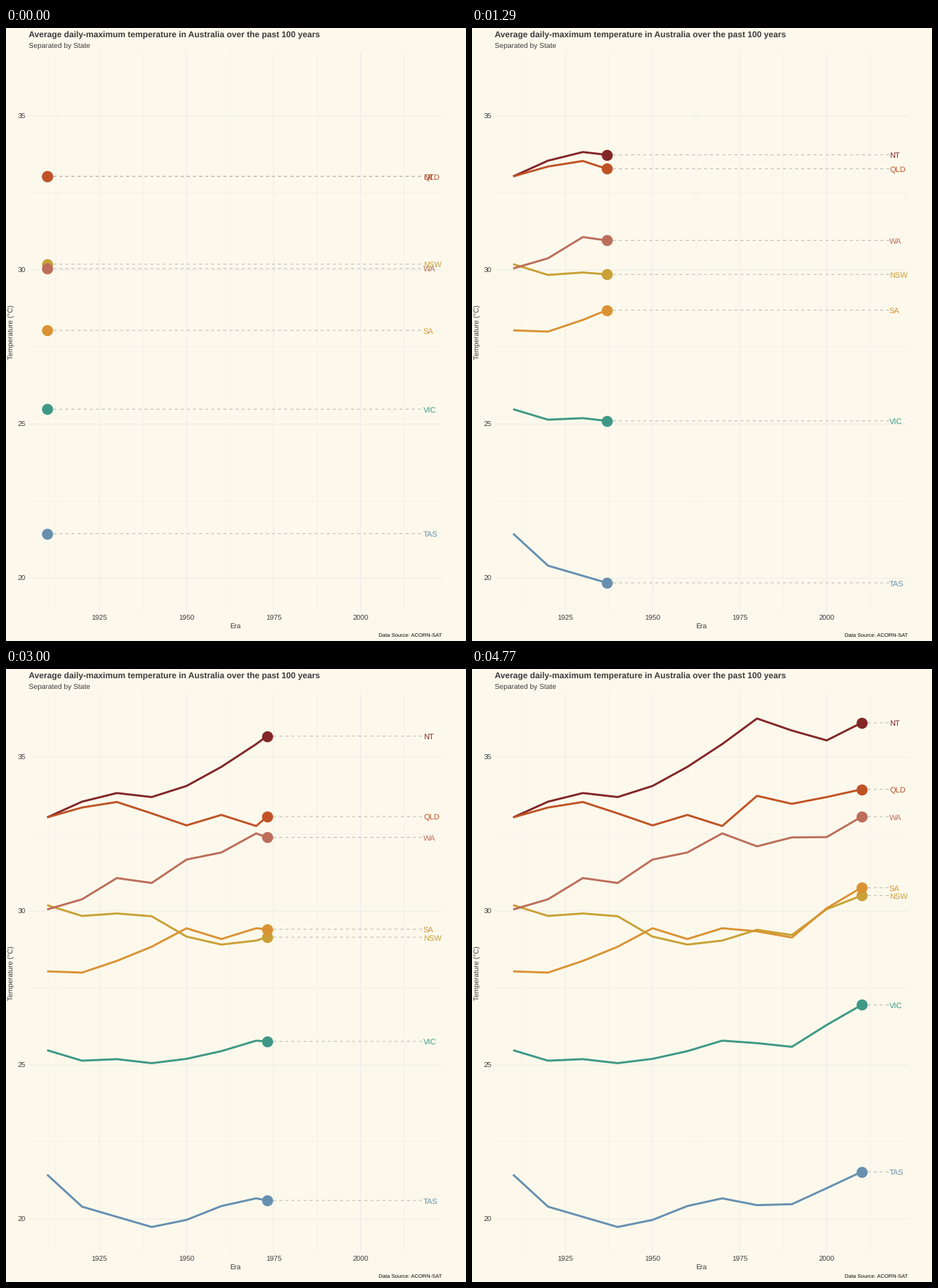
Recreate the animation shown at these times as a matplotlib script. Size 648x864 px, loop 7200 ms.

```python
import numpy as np
import matplotlib.pyplot as plt
from matplotlib.animation import FuncAnimation

WIDTH, HEIGHT, DPI = 648, 864, 72  # at 72 dpi one point is one pixel
FRAMES, INTERVAL, REVEAL_STEPS = 240, 30, 159
LEFT, RIGHT, TOP, BOTTOM = 31.5, 614.5, 34.2, 822.5
LABEL_YEAR = 2018
INK, PAPER, GRID, DASH = "#3C3C3C", "#FCF9EC", "#EBEBEB", "#BABABA"

plt.rcParams.update({
    "font.family": "Liberation Sans",
    "text.hinting": "none",
    "lines.solid_capstyle": "butt",
    "lines.solid_joinstyle": "round",
})

years = np.arange(1910, 2011, 10)
key_frames = np.round(np.linspace(0, REVEAL_STEPS, len(years)))

# state: (colour, mean daily maximum per decade)
states = {
    "NSW": ("#C9A136", [30.19, 29.84, 29.92, 29.83, 29.17, 28.91, 29.04, 29.39, 29.22, 30.06, 30.50]),
    "NT": ("#832627", [33.04, 33.55, 33.83, 33.70, 34.06, 34.68, 35.42, 36.25, 35.86, 35.54, 36.11]),
    "QLD": ("#C05326", [33.04, 33.36, 33.54, 33.17, 32.78, 33.12, 32.76, 33.74, 33.48, 33.70, 33.95]),
    "SA": ("#DA9333", [28.04, 28.00, 28.38, 28.84, 29.44, 29.09, 29.44, 29.34, 29.14, 30.09, 30.76]),
    "TAS": ("#6790B0", [21.44, 20.40, 20.07, 19.74, 19.97, 20.42, 20.67, 20.45, 20.48, 21.00, 21.53]),
    "VIC": ("#3F9886", [25.48, 25.14, 25.19, 25.06, 25.20, 25.45, 25.79, 25.71, 25.59, 26.30, 26.95]),
    "WA": ("#BC6E5B", [30.05, 30.38, 31.07, 30.91, 31.67, 31.90, 32.52, 32.10, 32.39, 32.40, 33.06]),
}

fig = plt.figure(figsize=(WIDTH / DPI, HEIGHT / DPI), dpi=DPI, facecolor=PAPER)
ax = fig.add_axes([LEFT / WIDTH, 1 - BOTTOM / HEIGHT,
                   (RIGHT - LEFT) / WIDTH, (BOTTOM - TOP) / HEIGHT])
ax.set_xlim(1904.6, 2023.4)
ax.set_ylim(18.91, 37.07)
ax.axis("off")


def pixel_text(x, y, text, size=10, color=INK, **style):
    style = {"ha": "left", "va": "baseline", **style}
    fig.text(x / WIDTH, 1 - y / HEIGHT, text, size=size, color=color, **style)


def draw_grid():
    for year in np.arange(1912.5, 2013, 12.5):
        ax.axvline(year, color=GRID, lw=1.07 if year % 25 == 0 else 0.6, snap=False, zorder=0)
    for temp in np.arange(20, 36, 2.5):
        ax.axhline(temp, color=GRID, lw=1.07 if temp % 5 == 0 else 0.6, snap=False, zorder=0)


def draw_labels():
    pixel_text(31.5, 13.6, "Average daily-maximum temperature in Australia over the past 100 years",
               11.85, weight="bold")
    pixel_text(31.5, 27.8, "Separated by State", 10.15)
    for year in (1925, 1950, 1975, 2000):
        x = LEFT + (year - 1904.6) / 118.8 * (RIGHT - LEFT)
        pixel_text(x, 834.6, str(year), ha="center")
    for temp in (20, 25, 30, 35):
        y = TOP + (37.07 - temp) / 18.16 * (BOTTOM - TOP)
        pixel_text(27.5, y + 4.2, str(temp), ha="right")
    pixel_text(323, 846.3, "Era", ha="center")
    pixel_text(12.2, 429, "Temperature (°C)", ha="right", va="center",
               rotation=90, rotation_mode="default")
    pixel_text(614.5, 858.2, "Data Source: ACORN-SAT", 7.45, "black", ha="right")


draw_grid()
draw_labels()

artists = []
for order, (name, (color, temps)) in enumerate(states.items()):
    layer = order / 10
    guide, = ax.plot([], [], color=DASH, lw=1.07, ls=(0, (4, 4)), dash_capstyle="butt",
                     snap=False, zorder=1 + layer)
    trail, = ax.plot([], [], color=color, lw=2.9, zorder=2 + layer)
    dot, = ax.plot([], [], "o", color=color, ms=15.6, mew=0, snap=False, zorder=3 + layer)
    label = ax.annotate(name, (LABEL_YEAR, temps[0]), (0, -4.4), textcoords="offset points",
                        size=11, color=color, va="baseline", zorder=4 + layer)
    artists.append((np.array(temps), guide, trail, dot, label))


def update(frame):
    year = np.interp(frame, key_frames, years)
    past = years < year
    for temps, guide, trail, dot, label in artists:
        temp = np.interp(year, years, temps)
        guide.set_data([year, LABEL_YEAR], [temp, temp])
        trail.set_data(np.append(years[past], year), np.append(temps[past], temp))
        dot.set_data([year], [temp])
        label.xy = (LABEL_YEAR, temp)
    return [artist for group in artists for artist in group[1:]]


animation = FuncAnimation(fig, update, frames=FRAMES, interval=INTERVAL, repeat=True, blit=False)
plt.show()
```
